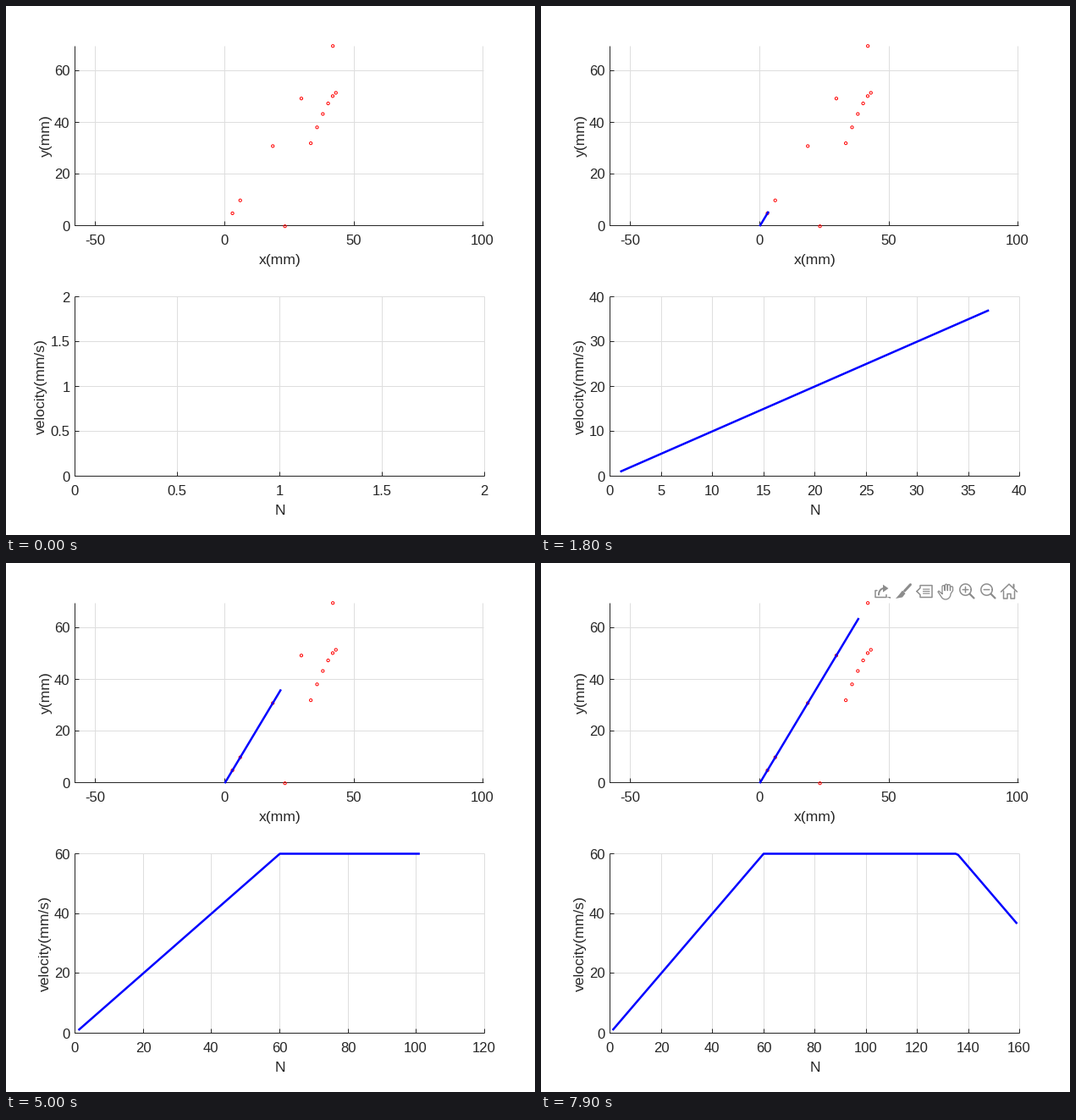
Recreate the animation shown at these times as a matplotlib script. Size 625 by 625 pixels, loop 8 s.

```python
import numpy as np
import matplotlib.pyplot as plt
from matplotlib.animation import FuncAnimation
from matplotlib.patches import Circle, Polygon

SIZE, DPI = 625, 100
PX = 72 / DPI
FRAMES, INTERVAL = 80, 100
INK, GRID, BLUE = "#262626", "#dedede", "#0000ff"
LEFT, RIGHT = 81.5, 565.5
TOP1, BASE1 = 47.5, 259.5
TOP2, BASE2 = 343.5, 555.5
X0, Y0, SCALE = 258.4, 260.2, 3.055
DIGIT = 9.27

plt.rcParams["font.family"] = "Liberation Sans"
fig = plt.figure(figsize=(SIZE / DPI, SIZE / DPI), dpi=DPI, facecolor="white")
ax = fig.add_axes([0, 0, 1, 1])
ax.set_xlim(0, SIZE)
ax.set_ylim(SIZE, 0)
ax.axis("off")


def line(xs, ys, color=INK, width=1, z=2, cap="butt"):
    return ax.plot(xs, ys, color=color, lw=width * PX, zorder=z, snap=False,
                   solid_capstyle=cap, solid_joinstyle="round")[0]


def text(x, y, s, size=16.67, ha="center", rot=0):
    return ax.text(x, y, s, fontsize=size * PX, color=INK, ha=ha, va="baseline",
                   rotation=rot, rotation_mode="anchor", zorder=4)


def x_tick(x, label, top, base):
    x = np.floor(x) + 0.5
    return [line([x, x], [top, base], GRID, z=1),
            line([x, x], [base, base - 5]),
            text(x - 0.5, base + 23, label)]


def y_tick(y, label, right):
    y = np.floor(y) + 0.5
    return [line([LEFT, right], [y, y], GRID, z=1),
            line([LEFT, LEFT + 5], [y, y]),
            text(75.5, y + 6, label, ha="right")]


def frame_lines(top, base, right):
    line([LEFT, LEFT], [top, base + 0.5])
    line([LEFT, right], [base, base])


def to_px(p):
    return X0 + SCALE * p[0], Y0 - SCALE * p[1]


# upper plot
for v in range(-50, 101, 50):
    x_tick(to_px((v, 0))[0], str(v), TOP1, BASE1)
for v in range(0, 61, 20):
    y_tick(BASE1 - SCALE * v + 0.3, str(v), 564.5)
frame_lines(TOP1, BASE1, 564.5)
text(323.5, 305, "x(mm)", 17.5)
text(52, 153, "y(mm)", 17.5, rot=90)

# way points: some on the ray, the rest on a curve that slows down
HEADING = np.array([3, 5])
ray = [HEADING * m for m in (1, 2, 6.2, 9.88, 13.94)]
rest = 1 - np.linspace(0, 1, 6)
curve = list(zip(43 - 9.7 * rest ** 1.28, 51.6 - 19.5 * rest ** 1.7))
for p in ray + curve + [(23.3, 0)]:
    ax.add_patch(Circle(to_px(p), 1.6, fill=False, ec="#ff0000", lw=PX, zorder=3))
path_line = line([], [], BLUE, 2.5, 3.5)

# lower plot
frame_lines(TOP2, BASE2, RIGHT)
text(323.5, 601, "N", 17.5)
speed_label = text(45, 449.5, "velocity(mm/s)", 17.5, rot=90)
speed_line = line([], [], BLUE, 2.5, 3.5)

# toolbar, each icon drawn around its own centre
ICON_Y = 33.5
icon_x = 403 + 25 * np.arange(7)
icons = []


def stroke(cx, pts, width=1.5):
    xs, ys = np.transpose(pts)
    icons.append(line(cx + xs, ICON_Y + ys, width=width, z=5, cap="round"))


def fill(cx, pts):
    icons.append(ax.add_patch(Polygon(np.add(pts, (cx, ICON_Y)), lw=0, zorder=5)))


def arc(cx, cy, rx, ry, a, b):
    t = np.radians(np.linspace(a, b, 30))
    return list(zip(cx + rx * np.cos(t), cy + ry * np.sin(t)))


def export_icon(x):
    stroke(x, [(-6, -1), (-8, -1), (-8, 7), (5, 7), (5, 4)])
    stroke(x, arc(2, 4, 6, 7.5, 180, 270), 2)
    fill(x, [(1, -8), (7.5, -3.5), (1, 1)])
    fill(x, [(5, 6), (10, 6), (10, 8.5)])


def brush_icon(x):
    stroke(x, [(8.5, -8), (1.5, -0.5)], 3)
    fill(x, [(-1, -1), (2.5, 2.5), (-1, 7), (-9, 8.5), (-5, 4)])


def note_icon(x):
    stroke(x, [(-9, 0), (-5, -4), (-5, -7), (9, -7), (9, 7), (-5, 7), (-5, 4), (-9, 0)])
    for y in (-2.5, 0, 2.5):
        stroke(x, [(-1.5, y), (6, y)], 1.2)


def hand_icon(x):
    outline = [(-4, 3), (-8, -0.5), (-9, 0.5)] + arc(0, 3, 6, 6.5, 150, 0)
    for i in reversed(range(4)):
        mid, tip = -2.5 + 3.2 * i, -7 + 0.9 * (i - 1.3) ** 2
        outline += [(mid + 1.5, -1)] + arc(mid, tip, 1.5, 1.5, 0, -180) + [(mid - 1.5, -1)]
    stroke(x, outline + [(-4, 3)], 1.3)


def zoom_icon(x, plus):
    stroke(x, arc(-1.5, -2, 6.7, 6.7, 0, 360))
    stroke(x, [(3.5, 3), (8.5, 8)], 2.2)
    stroke(x, [(-4.8, -2), (1.8, -2)])
    if plus:
        stroke(x, [(-1.5, -5.3), (-1.5, 1.3)])


def home_icon(x):
    stroke(x, [(-9.5, 0.5), (0, -8.5), (9.5, 0.5)])
    half = np.array([(6.5, -0.5), (6.5, 8.5), (2, 8.5), (2, 3)])
    stroke(x, np.vstack([half, half[::-1] * (-1, 1)]))
    stroke(x, [(5.5, -4.5), (5.5, -8)], 2)


export_icon(icon_x[0])
brush_icon(icon_x[1])
note_icon(icon_x[2])
hand_icon(icon_x[3])
zoom_icon(icon_x[4], True)
zoom_icon(icon_x[5], False)
home_icon(icon_x[6])


def nice_ticks(top, most):
    """Tightest round limits around 1..top with at most `most` intervals."""
    if top == 1:
        return np.linspace(0, 2, 5)
    best = None
    for step in (m * 10.0 ** e for e in (-1, 0, 1, 2) for m in (1, 2, 5)):
        lo = np.floor(1 / step + 1e-9) * step
        hi = np.ceil(top / step - 1e-9) * step
        count = round((hi - lo) / step)
        if count <= most and (best is None or hi - lo < best[0] - 1e-9):
            best = hi - lo, np.linspace(lo, hi, count + 1)
    return best[1]


def label_width(s):
    return DIGIT * (len(s) - s.count(".") / 2)


def ramp(k, start, length=3):
    return np.clip((k - start) / length, 0, 1)


# speed rises, holds at 60, then falls; distance is its running sum
steps = np.arange(1, 2 * FRAMES)
speed = np.minimum(np.minimum(steps, 60), 195.6 - steps)
dist = np.concatenate([[0], np.cumsum(speed)[:-1]]) * 0.01
UNIT = HEADING / np.hypot(*HEADING)
dynamic = []


def draw(k):
    while dynamic:
        dynamic.pop().remove()
    n = 2 * k + 1
    xt = nice_ticks(n, 8)
    yt = nice_ticks(min(n, 60), 5)

    def to_x(v):
        return LEFT + (v - xt[0]) / (xt[-1] - xt[0]) * (RIGHT - LEFT)

    def to_y(v):
        return BASE2 - (v - yt[0]) / (yt[-1] - yt[0]) * (BASE2 - TOP2)

    for v in xt:
        dynamic.extend(x_tick(to_x(v), f"{v:g}", TOP2, BASE2))
    for v in yt:
        dynamic.extend(y_tick(to_y(v), f"{v:g}", RIGHT))
    speed_label.set_x(69 - max(label_width(f"{v:g}") for v in yt))

    speed_line.set_data(to_x(steps[:n]), to_y(speed[:n]))
    path_line.set_data(*np.transpose([to_px((0, 0)), to_px(dist[n - 1] * UNIT)]))
    speed_line.set_visible(n > 1)
    path_line.set_visible(n > 1)

    shade = ramp(k, 10) - ramp(k, 14) + ramp(k, 69)
    for icon in icons:
        icon.set_color((1 - 0.45 * shade,) * 3)
        icon.set_visible(shade > 0)
    return []


anim = FuncAnimation(fig, draw, frames=FRAMES, interval=INTERVAL, repeat=True,
                     repeat_delay=0, blit=False)
plt.show()
```
